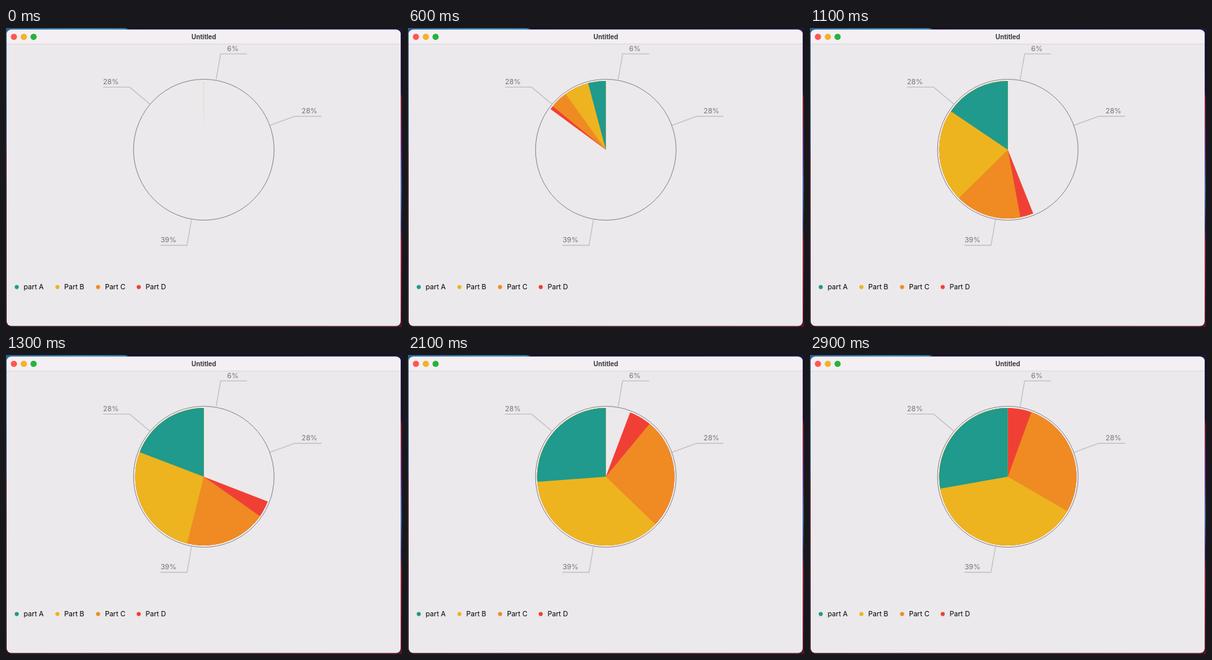
An HTML page that plays this animation: 600x452 px, repeating every 3000 ms.

```html
<!DOCTYPE html>
<html lang="en">
<head>
<meta charset="utf-8">
<title>Pie chart</title>
<style>
  html, body { margin: 0; width: 600px; height: 452px; overflow: hidden; }
  svg { display: block; font-family: Inter, sans-serif; }
</style>
</head>
<body>
<svg width="600" height="452" viewBox="0 0 600 452">
  <defs>
    <linearGradient id="top">
      <stop offset="0" stop-color="#2c5f94"/>
      <stop offset=".2" stop-color="#3079a8"/>
      <stop offset=".3" stop-color="#2b6fa3"/>
      <stop offset=".31" stop-color="#191238"/>
      <stop offset="1" stop-color="#1d1640"/>
    </linearGradient>
    <linearGradient id="left" x2="0" y2="1">
      <stop offset="0" stop-color="#2c5f94"/>
      <stop offset=".4" stop-color="#2a3f78"/>
      <stop offset=".44" stop-color="#5c1a2e"/>
      <stop offset="1" stop-color="#32101f"/>
    </linearGradient>
    <linearGradient id="right" x2="0" y2="1">
      <stop offset="0" stop-color="#1d1640"/>
      <stop offset=".22" stop-color="#241a44"/>
      <stop offset=".24" stop-color="#7a1a38"/>
      <stop offset=".42" stop-color="#5b2a7c"/>
      <stop offset=".55" stop-color="#3c5c9c"/>
      <stop offset=".68" stop-color="#352a60"/>
      <stop offset=".75" stop-color="#8a2038"/>
      <stop offset="1" stop-color="#5a1428"/>
    </linearGradient>
    <linearGradient id="bottom">
      <stop offset="0" stop-color="#32101f"/>
      <stop offset="1" stop-color="#5a1428"/>
    </linearGradient>
    <clipPath id="window"><rect x="1" y="2.5" width="597" height="448" rx="7"/></clipPath>
  </defs>

  <rect width="600" height="452" fill="url(#bottom)"/>
  <rect width="300" height="440" fill="url(#left)"/>
  <rect x="300" width="300" height="440" fill="url(#right)"/>
  <rect width="600" height="10" fill="url(#top)"/>
  <g clip-path="url(#window)">
    <rect width="600" height="452" fill="#ebe9eb"/>
    <rect width="600" height="24" fill="#f3eff3"/>
    <rect y="23.7" width="600" height="1" fill="#d9d6d9"/>
  </g>

  <circle cx="12" cy="13.4" r="4.7" fill="#fe5850"/>
  <circle cx="27" cy="13.4" r="4.7" fill="#f5b126"/>
  <circle cx="41.8" cy="13.4" r="4.7" fill="#24b43a"/>
  <text x="299.8" y="16.9" font-size="9.7" font-weight="700" text-anchor="middle" fill="#3c393c">Untitled</text>

  <g fill="none" stroke="#c1bfc1" stroke-width="1.3">
    <path d="M318.4 78 325.2 39.2H365.3M400 147.2 437.5 133.5H477.8M281 290 274.2 328.5H234M218 115 187.3 89.4H147"/>
  </g>
  <g font-size="10.8" fill="#777577">
    <text x="335" y="34.6">6%</text>
    <text x="447.8" y="129">28%</text>
    <text x="234.2" y="324.2">39%</text>
    <text x="147" y="84.6">28%</text>
  </g>

  <g id="pie" transform="translate(299.7 184)"></g>
  <circle cx="299.7" cy="184" r="106.5" fill="none" stroke="#878587"/>
  <g id="legend" font-size="10.6"></g>
</svg>
<script>
const PERIOD = 3000, STEP = 100, LEAD = 26, RADIUS = 104;
const parts = [
  { name: 'part A', degrees: 100, color: '#1f9a8c' },
  { name: 'Part B', degrees: 140, color: '#edb41f' },
  { name: 'Part C', degrees: 100, color: '#ef8b22' },
  { name: 'Part D', degrees: 20, color: '#f04035' }
];

function add(parent, tag, attrs, text = '') {
  const el = document.createElementNS('http://www.w3.org/2000/svg', tag);
  for (const key in attrs) el.setAttribute(key, attrs[key]);
  el.textContent = text;
  return parent.appendChild(el);
}

// Each sector runs from the top to its far edge; smaller ones cover larger ones.
const pie = document.getElementById('pie');
const legend = document.getElementById('legend');
const halo = add(pie, 'path', { fill: '#f5f3f5' });
let total = 0;
parts.forEach((part, i) => {
  part.end = total += part.degrees;
  const x = 16.3 + i * 61.6;
  add(legend, 'circle', { cx: x, cy: 391.6, r: 3.1, fill: part.color });
  add(legend, 'text', { x: x + 10.4, y: 395.4 }, part.name);
});
for (const part of [...parts].reverse()) part.path = add(pie, 'path', { fill: part.color });

// cubic-bezier(0.4, 0, 0.2, 1)
function ease(x) {
  let low = 0, high = 1, s;
  for (let i = 0; i < 30; i++) {
    s = (low + high) / 2;
    const r = 1 - s;
    if (1.2 * s * r * r + 0.6 * s * s * r + s ** 3 < x) low = s;
    else high = s;
  }
  return s * s * (3 - 2 * s);
}

function sector(degrees, r) {
  const a = degrees * Math.PI / 180;
  return `M0 0V${-r}A${r} ${r} 0 ${+(degrees > 180)} 0 ${-r * Math.sin(a)} ${-r * Math.cos(a)}Z`;
}

function draw(now) {
  const time = Math.floor(now % PERIOD / STEP) * STEP;
  const progress = ease((time + LEAD) / PERIOD);
  halo.setAttribute('d', sector(total * progress, RADIUS + 1.6));
  for (const part of parts) part.path.setAttribute('d', sector(part.end * progress, RADIUS));
}

const start = performance.now();
function tick() {
  draw(performance.now() - start);
  requestAnimationFrame(tick);
}
tick();
</script>
</body>
</html>
```
